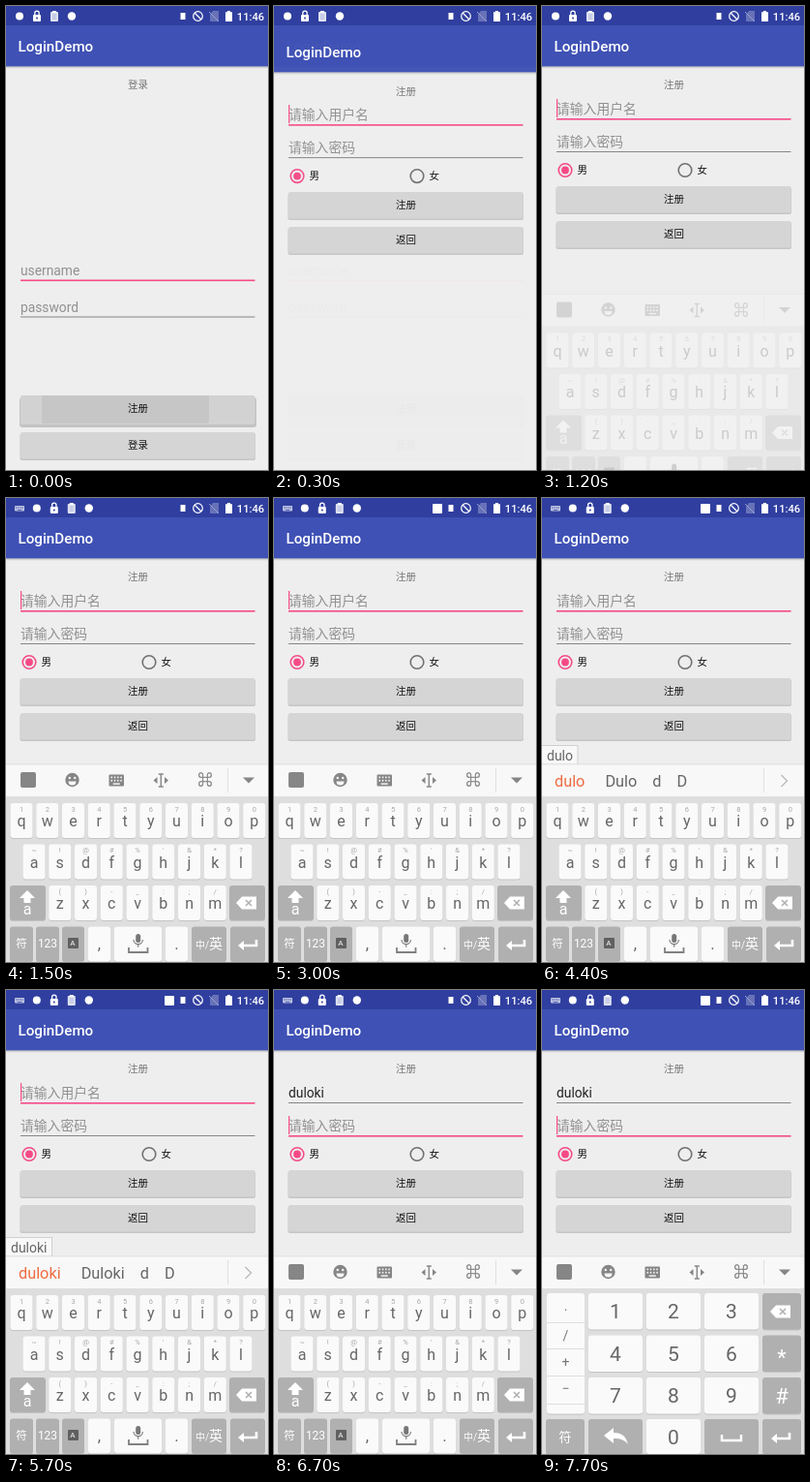
Write an HTML page that moves like this. It is 271 by 479 pixels and loops after 8 s.

```html
<!DOCTYPE html>
<html lang="zh-CN">
<head>
<meta charset="utf-8">
<title>LoginDemo</title>
<style>
  html, body { margin: 0; height: 100%; overflow: hidden; background: #eee; }
  svg { display: block; width: 271px; height: 479px; font-family: Roboto, 'Noto Sans CJK SC', 'Noto Sans CJK', sans-serif; }
</style>
</head>
<body>
<svg id="stage" viewBox="0 0 271 479"></svg>
<script>
const PINK = '#f54a86', DARK = '#b0b0b0', INK = '#666', ICON = '#868686';
const NAME = 'duloki';

// Drawing helpers; text is placed by its vertical centre
const rect = (x, y, w, h, fill, r = 0, more = '') =>
  `<rect x="${x}" y="${y}" width="${w}" height="${h}" rx="${r}" fill="${fill}" ${more}/>`;
const circle = (x, y, r, fill, more = '') => `<circle cx="${x}" cy="${y}" r="${r}" fill="${fill}" ${more}/>`;
const path = (d, fill, more = '') => `<path d="${d}" fill="${fill}" ${more}/>`;
const line = (d, color, w = 1) => path(d, 'none', `stroke="${color}" stroke-width="${w}"`);
const text = (s, x, y, size, fill, anchor = 'middle', weight = 400, more = '') =>
  `<text x="${x}" y="${y + size * 0.365}" font-size="${size}" fill="${fill}" text-anchor="${anchor}" font-weight="${weight}" ${more}>${s}</text>`;
const group = (id, body) => `<g id="${id}">${body}</g>`;

const button = (label, y) =>
  rect(14.5, y + 1, 243.5, 28, '#c6c6c6', 2) + rect(15, y, 242.5, 27.5, '#d5d5d5', 2) +
  text(label, 136.5, y + 13.4, 10.5, '#111', 'middle', 500);
const hint = (s, y, id = '') => text(s, 15, y - 0.3, 13.8, '#909090', 'start', 400, id && `id="${id}"`);
const underline = (y, id, focused) =>
  rect(15, y, 242.5, focused ? 1.6 : 1, focused ? PINK : '#858585', 0, `id="${id}"`);
const radio = (label, x, on) =>
  circle(x, 169.5, 6.8, 'none', `stroke="${on ? PINK : '#707070'}" stroke-width="1.6"`) +
  (on ? circle(x, 169.5, 3.9, PINK) : '') + text(label, x + 12.5, 169.3, 10.5, '#111', 'start', 500);

const page = (title, body) =>
  rect(0, 0, 271, 479, '#eee') + rect(0, 62, 271, 1, '#9a9fbe') + rect(0, 63, 271, 1, '#d2d2d4') +
  rect(0, 64, 271, 1, '#e6e6e6') + rect(0, 0, 271, 62, '#3f51b5') +
  text('LoginDemo', 12.5, 41.5, 15.2, '#fff', 'start', 500) + text(title, 136.5, 81.6, 10.5, '#757575') + body;

const login = page('登录',
  hint('username', 273) + underline(282.5, 'loginName', true) +
  hint('password', 311) + underline(320.5, 'loginPass', false) +
  rect(14, 404, 245, 31, '#c3c3c3', 3) + rect(15, 402, 242.5, 30, '#d2d2d2', 2) +
  rect(37, 402, 173, 29, '#c6c6c6', 2, 'id="ripple"') +
  text('注册', 136.5, 415.5, 10.5, '#111', 'middle', 500) + button('登录', 440));

const register = page('注册',
  hint('请输入用户名', 106, 'nameHint') + text(NAME, 15, 106, 13.8, '#222', 'start', 400, 'id="nameText"') +
  underline(116, 'nameLine', true) + hint('请输入密码', 140) + underline(150, 'passLine', false) +
  rect(15, 96, 1.2, 19, PINK, 0, 'id="caret"') +
  radio('男', 24, true) + radio('女', 148, false) + button('注册', 186) + button('返回', 222));

const miniKeyboard = (x, y, w, h, fill, dot) => {
  let s = rect(x, y, w, h, fill, 1);
  for (let i = 0; i < 4; i++)
    for (let j = 0; j < 2; j++) s += rect(x + w * (0.13 + i * 0.21), y + h * (0.17 + j * 0.28), w * 0.1, h * 0.14, dot);
  return s + rect(x + w * 0.27, y + h * 0.74, w * 0.46, h * 0.12, dot);
};

const status =
  rect(0, 0, 271, 20, '#303f9f') +
  group('imeIcon', miniKeyboard(9, 8, 10, 5.5, '#c3c9e6', '#303f9f')) +
  group('leftIcons',
    circle(14, 10.5, 4, '#fff') +
    rect(28, 9, 8, 7, '#fff', 1) + line('M29.8 9V7.4a2.2 2.2 0 0 1 4.4 0V9', '#fff', 1.3) + circle(32, 12.5, 1, '#303f9f') +
    rect(46, 6, 8, 10, '#dfe2f2', 1) + rect(48, 5, 4, 2, '#fff') + line('M48 9h4M48 11h4M48 13h4', '#a4abd6', 0.8) +
    circle(68, 10.5, 4.2, '#fff')) +
  rect(164, 6, 10, 10, '#fff', 1, 'id="imeBadge"') +
  rect(180.5, 7, 5, 7, '#fff') +
  circle(198.5, 10.5, 4.8, 'none', 'stroke="#fff" stroke-width="1.2"') + line('M195 7l7 7', '#fff', 1.2) +
  path('M211 9l3-4h6v11h-9z', '#6772b8') + line('M210 6l10 10', '#98a0d0', 1) +
  path('M227 6.2h2V5h3v1.2h2V16h-7z', '#fff') +
  text('11:46', 253, 10.8, 11.2, '#fff', 'middle', 500);

const keyBox = (x, y, w, fill = '#fafafa', h = 36) => rect(x, y + 1, w, h, '#c4c4c4', 3) + rect(x, y, w, h, fill, 3);
const keys = {};
const letterRow = (letters, marks, x0, y) => [...letters].map((c, i) => {
  const x = x0 + i * 26.75;
  keys[c] = { x, y };
  return keyBox(x - 11.5, y, 23) + text(marks[i], x, y + 6.2, 7.5, '#a8a8a8') + text(c, x, y + 18.3, 16, INK);
}).join('');

const eraseIcon = (x, y) =>
  path(`M${x - 11} ${y}l6-6.5h15v13h-15z`, '#fff') + line(`M${x - 1} ${y - 3}l6 6m0-6l-6 6`, DARK, 1.6);
const enterIcon = (x, y) => line(`M${x + 9} ${y - 6}v6h-15`, '#fff', 2.6) + path(`M${x - 10} ${y}l6-5v10z`, '#fff');

const letterKeys =
  letterRow('qwertyuiop', '1234567890', 16, 315) +
  letterRow('asdfghjkl', "~!@#%'&*?", 29, 357.5) +
  letterRow('zxcvbnm', '()-_:;/', 55.8, 400) +
  keyBox(4, 400, 37, DARK) + path('M22 405l8 8h-4.5v5h-7v-5H14z', '#fff') + text('a', 22, 424, 16, '#fff') +
  keyBox(231, 400, 37, DARK) + eraseIcon(249, 418) +
  keyBox(4, 442.5, 24, DARK) + text('符', 16, 460, 11.5, '#fff') +
  keyBox(31, 442.5, 24, DARK) + rect(31, 442.5, 24, 36, '#929292', 3, 'id="numPress"') + text('123', 43, 460, 12, '#fff') +
  keyBox(58, 442.5, 23, DARK) + rect(64, 454, 11, 11, '#606060', 1) + text('A', 69, 459.5, 8, '#ddd', 'middle', 500) +
  keyBox(85, 442.5, 23) + text(',', 96.5, 460, 17, INK) +
  keyBox(112, 442.5, 49) + rect(134.2, 450, 5, 9, '#777', 2.5) +
  line('M132 456a4.7 4.7 0 0 0 9.4 0M136.7 460.7v3', '#808080', 1.2) + line('M127 464v5h19.5v-5', '#808080', 1.8) +
  keyBox(165, 442.5, 23) + text('.', 176.5, 460, 17, INK) +
  keyBox(192, 442.5, 36, DARK) + text('<tspan font-size="10">中/</tspan>英', 210, 460, 14, '#fff') +
  keyBox(232, 442.5, 36, DARK) + enterIcon(250, 462);

const numberKeys =
  keyBox(5, 313, 39, '#fafafa', 124.5) + line('M5 343.5h39M5 370.5h39M5 398.5h39M5 427.5h39', '#dedede') +
  [...'·/+−'].map((c, i) => text(c, 24.5, 330.5 + i * 26.8, 14, '#777')).join('') +
  [...'123456789'].map((c, i) => {
    const x = 48 + (i % 3) * 60, y = 313 + Math.floor(i / 3) * 43.5;
    return keyBox(x, y, 56, '#fafafa', 37.5) + text(c, x + 28, y + 18.5, 21, INK);
  }).join('') +
  keyBox(228, 313, 40, DARK, 37.5) + eraseIcon(247, 332) +
  keyBox(228, 356.5, 40, DARK, 37.5) + text('*', 248, 379, 22, '#fff') +
  keyBox(228, 400, 40, DARK, 37.5) + text('#', 248, 419, 22, '#fff') +
  keyBox(4, 443, 40, DARK) + text('符', 24, 461, 13, '#fff') +
  keyBox(48, 443, 56, DARK) + path('M64 460l10-8v5c9 0 13 4 15 12c-4-5-8-6-15-6v5z', '#fff') +
  keyBox(108, 443, 56) + text('0', 136, 461, 21, INK) +
  keyBox(168, 443, 56, DARK) + line('M186 459v6h20v-6', '#fff', 2.4) +
  keyBox(228, 443, 40, DARK) + enterIcon(247, 463);

const toolbar =
  rect(15, 283, 16, 16, ICON, 2) +
  circle(68.5, 291, 7.2, ICON) + circle(65.8, 289, 1.2, '#f7f7f7') + circle(71.2, 289, 1.2, '#f7f7f7') +
  path('M64.5 292.5h8a4 4 0 0 1-8 0z', '#f7f7f7') +
  miniKeyboard(106.5, 285.5, 15.5, 12, ICON, '#f7f7f7') +
  line('M160.3 285v13M157.8 285h5M157.8 298h5', ICON, 1.4) + path('M152.5 291.5l4-3.5v7zM168 291.5l-4-3.5v7z', ICON) +
  text('⌘', 206, 291, 15, ICON, 'middle', 400, `stroke="${ICON}" stroke-width="0.5"`) + path('M245 288.5h12l-6 6z', ICON);

const candidates =
  text('', 13, 292, 16.3, INK, 'start', 400, 'id="words"') + line('M247.5 286l6 6l-6 6', '#bbb', 1.4);

const keyboard =
  rect(0, 275, 271, 204, '#dedede') + rect(0, 274.5, 271, 33.5, '#f8f8f8') + rect(0, 274.5, 271, 0.8, '#d9d9d9') +
  rect(229, 279, 1, 25, '#e0e0e0') + group('toolbar', toolbar) + group('candidates', candidates) +
  group('letterKeys', letterKeys) + group('numberKeys', numberKeys) +
  group('popup', rect(-19.5, -42, 39, 43, '#c0c0c0', 4) + rect(-18.5, -41, 37, 41, '#fff', 4) +
    rect(-11.5, 0, 23, 36, '#cfcfcf', 3) + text('', 0, -20, 24, INK, 'middle', 400, 'id="popupChar"'));

const tag = group('tag', rect(-1, 255.5, 37, 19.5, '#f8f8f8', 0, 'id="tagBox" stroke="#d0d0d0"') +
  text('', 5, 266, 14, INK, 'start', 400, 'id="tagText"'));

const $ = id => document.getElementById(id);
$('stage').innerHTML = group('login', login) + group('register', register) + status + tag + group('keyboard', keyboard);

const show = (id, on) => $(id).setAttribute('display', on ? 'inline' : 'none');
const move = (id, x, y) => $(id).setAttribute('transform', `translate(${x} ${y})`);
const set = (id, attrs) => { for (const k in attrs) $(id).setAttribute(k, attrs[k]); };
const clamp = v => Math.max(0, Math.min(1, v));

const BLINKS = [700, 1200, 1700, 2100, 2500, 3000, 3400, 3900, 4400, 4800, 5300, 5700, 6400, 6600, 7100, 7600];
const PRESSES = [[3400, 3500], [3600, 3700], [3800, 3900], [3900, 4000], [4800, 5000], [5100, 5300]];
const COMMIT = 5900, FOCUS = 6600;

function setFocus(id, y, on) {
  set(id, { y, height: on ? 1.6 : 1, fill: on ? PINK : '#858585' });
}

function draw(t) {
  // Opening page rises and fades in
  const left = 1 - clamp(t / 500);
  show('login', t < 500);
  show('register', t >= 100);
  move('register', 0, 38 * left * left);
  set('register', { opacity: t >= 400 ? 1 : clamp(t / 310) });
  set('ripple', t < 100 ? { x: 37, width: 173 } : { x: 15, width: 242.5 });

  const committed = t >= COMMIT, onPass = t >= FOCUS;
  show('nameHint', !committed);
  show('nameText', committed);
  setFocus('nameLine', 116, !onPass);
  setFocus('passLine', 150, onPass);
  show('caret', BLINKS.filter(b => t >= b).length % 2 === 0);
  set('caret', { x: committed && !onPass ? 16 + $('nameText').getComputedTextLength() : 15, y: onPass ? 130 : 96 });

  // Keyboard entrance
  const rise = clamp((t - 1100) / 400);
  show('keyboard', t >= 1200);
  move('keyboard', 0, 40 * (1 - rise) ** 2);
  set('keyboard', { opacity: rise });
  show('imeIcon', t >= 1300);
  move('leftIcons', t >= 1300 ? 17.8 : 0, 0);
  show('imeBadge', (t >= 1700 && t < FOCUS) || t >= 7100);
  show('letterKeys', t < 7700);
  show('numberKeys', t >= 7700);
  show('numPress', t === 7600);

  // Composition
  const typed = NAME.slice(0, PRESSES.filter(p => t >= p[1]).length);
  const composing = typed !== '' && !committed;
  show('tag', composing);
  show('candidates', composing);
  show('toolbar', !composing);
  if (composing) {
    const cap = s => s[0].toUpperCase() + s.slice(1);
    const first = typed[0];
    $('tagText').textContent = typed;
    $('tagBox').setAttribute('width', $('tagText').getComputedTextLength() + 11);
    $('words').innerHTML = `<tspan fill="#ee6c43">${typed}</tspan><tspan dx="21">${cap(typed)}</tspan>` +
      (typed.length > 1 ? `<tspan dx="16">${first}</tspan><tspan dx="16">${cap(first)}</tspan>` : '');
  }
  const active = PRESSES.findIndex(p => t >= p[0] && t < p[1]);
  show('popup', active >= 0);
  if (active >= 0) {
    const c = NAME[active];
    move('popup', keys[c].x, keys[c].y);
    $('popupChar').textContent = c;
  }
}

const start = performance.now();
function tick() {
  const t = (performance.now() - start) % 8000;
  draw(Math.floor(t / 100) * 100);
  requestAnimationFrame(tick);
}
tick();
</script>
</body>
</html>
```
